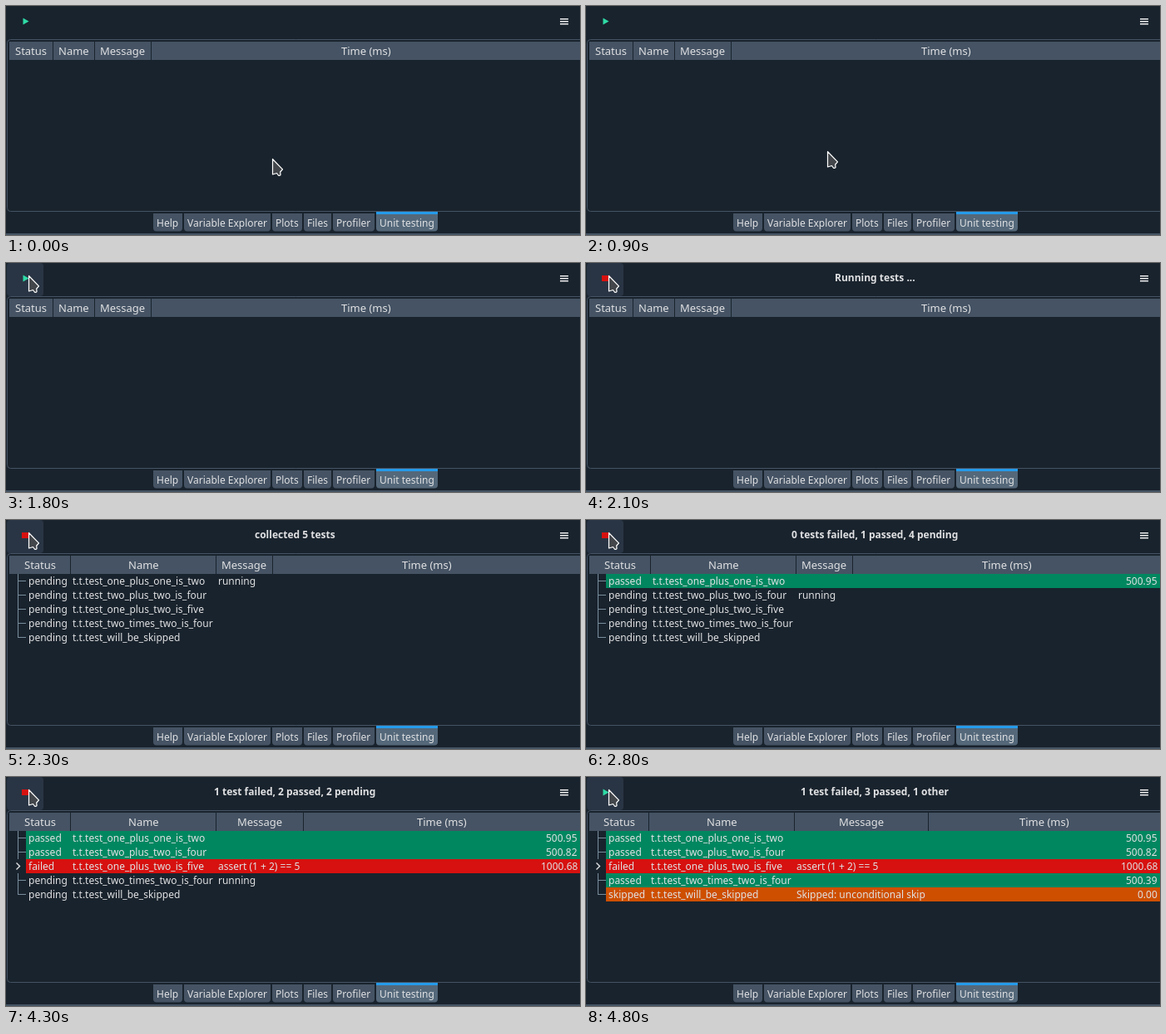
Write an HTML page with a canvas that moves like this. It is 690 px wide and 276 px high and loops after 6.5 s.

```html
<!DOCTYPE html>
<html lang="en">
<head>
<meta charset="utf-8">
<title>Unit testing pane</title>
<style>
html, body { margin: 0; height: 100%; overflow: hidden; background: #19232d; }
canvas { display: block; }
</style>
</head>
<body>
<canvas id="stage" width="690" height="276"></canvas>
<script>
const ctx = document.getElementById('stage').getContext('2d');
const LOOP = 6500, WIDTH = 690, ROW_TOP = 65, ROW_HEIGHT = 17;
const BACK = '#19232d', PANEL = '#455364', TEXT = '#e0e1e3', BRANCH = '#788d9c', RED = '#d6110f';
const STATUS_COLORS = { passed: '#008760', failed: RED, skipped: '#ce4f00' };

const TESTS = [
  ['t.t.test_one_plus_one_is_two', 'passed', '', '500.95'],
  ['t.t.test_two_plus_two_is_four', 'passed', '', '500.82'],
  ['t.t.test_one_plus_two_is_five', 'failed', 'assert (1 + 2) == 5', '1000.68'],
  ['t.t.test_two_times_two_is_four', 'passed', '', '500.39'],
  ['t.t.test_will_be_skipped', 'skipped', 'Skipped: unconditional skip', '0.00'],
];

// done: number of finished tests, -1 while the table is empty
const STATES = [
  { at: 0, title: '', done: -1, seps: [56, 106, 174] },
  { at: 2100, title: 'Running tests ...', done: -1, seps: [56, 106, 174] },
  { at: 2300, title: 'collected 5 tests', done: 0, seps: [77, 252, 320] },
  { at: 2800, title: '0 tests failed, 1 passed, 4 pending', done: 1, seps: [77, 252, 320] },
  { at: 3300, title: '0 tests failed, 2 passed, 3 pending', done: 2, seps: [77, 252, 320] },
  { at: 4300, title: '1 test failed, 2 passed, 2 pending', done: 3, seps: [77, 252, 357] },
  { at: 4800, title: '1 test failed, 3 passed, 1 other', done: 5, seps: [75, 250, 411] },
];

const TABS = [
  ['Help', 177, 35], ['Variable Explorer', 214, 104], ['Plots', 320, 36],
  ['Files', 358, 33], ['Profiler', 393, 50], ['Unit testing', 445, 74],
];

const ARROW = new Path2D('M.5 .5V19L5.5 17.5L7.3 20Q8.8 21 10 19.6L9.7 16L12.5 12.8Z');

function rect(x, y, w, h, color) {
  ctx.fillStyle = color;
  ctx.fillRect(x, y, w, h);
}

function rounded(x, y, w, h, radii, color) {
  ctx.fillStyle = color;
  ctx.beginPath();
  ctx.roundRect(x, y, w, h, radii);
  ctx.fill();
}

// align: 0 = left, 0.5 = centre, 1 = right
function text(str, x, y, align = 0, style = '12px') {
  ctx.font = style + ' "Noto Sans", sans-serif';
  ctx.fillStyle = TEXT;
  ctx.fillText(str, Math.round(x - ctx.measureText(str).width * align), y);
}

function polyline(color, ...points) {
  ctx.strokeStyle = color;
  ctx.beginPath();
  for (const [x, y] of points) ctx.lineTo(x, y);
  ctx.stroke();
}

function drawToolbar(t, state) {
  if (t >= 1500) {
    const pressed = t >= 2000 && t < 2100;
    rounded(1, 0, 44, 40, 4, pressed ? '#37414f' : '#293544');
  }
  if (t >= 2100 && state.done < TESTS.length) {
    rect(19, 15, 8, 7, RED);
  } else {
    ctx.fillStyle = '#2fdba6';
    ctx.beginPath();
    ctx.moveTo(20.5, 14.5);
    ctx.lineTo(27.5, 18.5);
    ctx.lineTo(20.5, 22.5);
    ctx.fill();
  }
  text(state.title, 347, 22, 0.5, 'bold 12px');
  for (const y of [15, 18, 21]) rect(666, y, 10, 1.4, '#fafafa');
}

function drawHeader(seps) {
  rect(4, 43, WIDTH, 22, PANEL);
  const edges = [4, ...seps, WIDTH];
  ['Status', 'Name', 'Message', 'Time (ms)'].forEach((label, i) => {
    text(label, (edges[i] + edges[i + 1]) / 2 + 0.5, 59, 0.5, '13px');
  });
  for (const x of seps) rect(x, 43, 1, 22, BACK);
}

function drawBranch(i, status) {
  const y = ROW_TOP + i * ROW_HEIGHT, mid = y + 8.5;
  if (status === 'failed') {
    ctx.lineWidth = 1.4;
    polyline(TEXT, [12.5, mid - 4], [16.5, mid], [12.5, mid + 4]);
    ctx.lineWidth = 1;
    return;
  }
  const bottom = i === TESTS.length - 1 ? mid : y + ROW_HEIGHT;
  polyline(BRANCH, [14.5, y], [14.5, bottom]);
  polyline(BRANCH, [14, mid], [24, mid]);
}

function drawRows({ done, seps }) {
  if (done < 0) return;
  TESTS.forEach(([name, result, note, time], i) => {
    const y = ROW_TOP + i * ROW_HEIGHT, base = y + 13;
    const finished = i < done;
    const status = finished ? result : 'pending';
    const message = finished ? note : i === done ? 'running' : '';
    if (finished) {
      rect(24, y, WIDTH, ROW_HEIGHT, STATUS_COLORS[status]);
      text(time, 687, base, 1);
    }
    drawBranch(i, status);
    text(status, 27, base);
    text(name, seps[0] + 3, base);
    text(message, seps[1] + 3, base);
  });
}

function drawTabs() {
  TABS.forEach(([label, x, w], i) => {
    const active = i === TABS.length - 1;
    rounded(x, 250, w, 21.5, [0, 0, 4, 4], active ? '#54687a' : PANEL);
    if (active) rect(x, 248, w, 3, '#259ae9');
    text(label, x + 4, 266);
  });
  rect(0, 274, WIDTH, 2, PANEL);
}

function drawPointer(t) {
  // The pointer moves in 100 ms ticks, then nudges once more before the click.
  const u = Math.min(1, Math.max(0, Math.floor((t - 800) / 100) / 7));
  const smooth = u * u * (3 - 2 * u);
  let x = Math.round(320 - 287 * (0.57 * u + 0.43 * smooth));
  let y = Math.round(184 - 171 * smooth);
  if (t >= 1800) [x, y] = [27, 15];
  ctx.save();
  ctx.translate(x, y);
  ctx.lineWidth = 1.2;
  ctx.lineJoin = 'round';
  ctx.fillStyle = '#43474b';
  ctx.strokeStyle = '#fff';
  ctx.fill(ARROW);
  ctx.stroke(ARROW);
  ctx.restore();
}

function draw(now) {
  const t = now % LOOP;
  const state = STATES.findLast(s => t >= s.at);
  rect(0, 0, WIDTH, 276, BACK);
  drawToolbar(t, state);
  ctx.strokeStyle = PANEL;
  ctx.beginPath();
  ctx.roundRect(1.5, 40.5, WIDTH + 10, 207, 4);
  ctx.stroke();
  drawHeader(state.seps);
  drawRows(state);
  drawTabs();
  drawPointer(t);
}

const start = performance.now();
function tick() {
  draw(performance.now() - start);
  requestAnimationFrame(tick);
}
tick();
</script>
</body>
</html>
```
